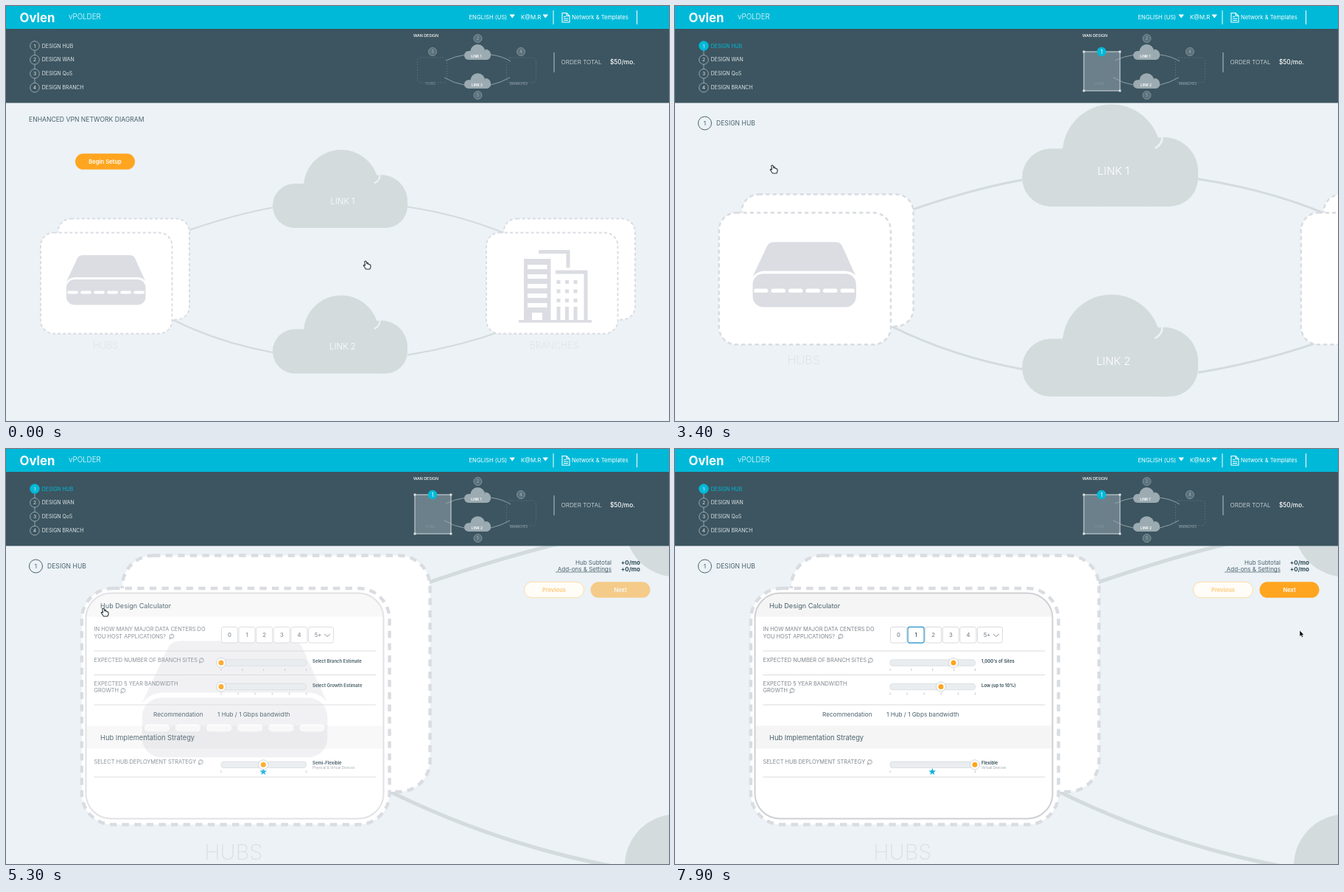
An HTML page that plays this animation: 900x563 px, repeating every 8 s.

```html
<!DOCTYPE html>
<html lang="en">
<head>
<meta charset="utf-8">
<title>Network setup</title>
<style>
html, body { margin: 0; width: 100%; height: 100%; overflow: hidden; background: #ecf2f6; }
svg { display: block; width: 900px; height: 563px; font-family: Inter, "Liberation Sans", sans-serif; }
.mid { text-anchor: middle; }
.end { text-anchor: end; }
</style>
</head>
<body>
<svg id="stage" viewBox="0 0 900 563"></svg>
<script>
const LOOP = 8000, STEP = 100;
const CYAN = '#00b9d8', DARK = '#3c5560', PALE = '#ecf2f6', CLOUD = '#d3dbdd',
      ICON = '#dcdde3', ORANGE = '#ffa51f', INK = '#4a626d', GREY = '#7f868d';

// --- Markup helpers ---
const attrs = o => Object.entries(o).map(([k, v]) => ` ${k}="${v}"`).join('');
const rect = (x, y, width, height, fill, more = {}) =>
  `<rect${attrs({ x, y, width, height, fill, ...more })}/>`;
const circle = (cx, cy, r, fill, more = {}) => `<circle${attrs({ cx, cy, r, fill, ...more })}/>`;
const line = (d, stroke, width = 1, more = {}) =>
  `<path${attrs({ d, fill: 'none', stroke, 'stroke-width': width, ...more })}/>`;
const shape = (d, fill, more = {}) => `<path${attrs({ d, fill, ...more })}/>`;
const text = (x, y, s, size, fill, more = {}) =>
  `<text${attrs({ x, y, 'font-size': size, fill, ...more })}>${s.replace(/&/g, '&amp;')}</text>`;
const group = (id, body, more = {}) => `<g${attrs({ id, ...more })}>${body}</g>`;
const MID = { class: 'mid' }, END = { class: 'end' };
const bold = (w = 600) => ({ 'font-weight': w });

// --- Diagram ---
function cloud(y, fill, gap) {
  return `<g transform="translate(0 ${y})">` +
    rect(362, 241, 183, 60, fill, { rx: 30 }) + circle(455, 246, 51, fill) +
    circle(509, 265, 36, fill) + rect(404, 240, 100, 50, fill) +
    line('M507.5 228Q508.5 236 500 240.5', gap, 2) + '</g>';
}

function cards(x) {
  const card = (x, y) => rect(x, y, 178.5, 137, '#fff',
    { rx: 18, stroke: '#d9dce1', 'stroke-width': 1.9, 'stroke-dasharray': '4 3.1' });
  return card(x + 23.5, 288.5) + card(x, 307.5);
}

function router() {
  let s = shape('M82 374L97 342Q99 338 105 338H168Q173 338 175 342L189 373Q185 368 178 368H94Q87 368 82 374Z', ICON) +
    rect(82, 371, 107.5, 34.5, ICON, { rx: 11 });
  for (let i = 0; i < 6; i++) s += rect(83.2 + 18 * i, 386.5, 14.8, 4, '#fff', { rx: 2 });
  return s;
}

function buildings() {
  let s = line('M723 333.5H763V355M746 361H787V427', ICON, 5) +
    rect(703, 343, 36.5, 85, ICON) + rect(696, 426, 99, 3.5, ICON);
  for (let i = 0; i < 5; i++) s += rect(708, 351 + 13 * i, 26.5, 6, '#fff');
  s += rect(714, 416, 14, 10, '#fff');
  for (const x of [747.5, 759, 770.5]) {
    for (const y of [372, 384.5, 397]) s += rect(x, y, 5, 5, ICON);
    s += rect(x, 408, 5, 19, ICON);
  }
  return s;
}

const LINKS = 'M226 312Q303 284 362 273.5M545 272.5Q615 283 676 308M226 425.5Q290 457 362 470M545 473.5Q615 462 676 440';

function diagram() {
  const thin = { class: 'mid', 'font-weight': 200 }, light = { class: 'mid', 'font-weight': 300 };
  return line(LINKS, CLOUD, 2.2) + cloud(0, CLOUD, PALE) + cloud(197.5, CLOUD, PALE) +
    text(457, 268.5, 'LINK 1', 11.4, '#fff', light) + text(457, 465.5, 'LINK 2', 11.4, '#fff', light) +
    cards(47) + cards(652) + router() + buildings() +
    text(135, 465, 'HUBS', 12.4, '#d9dfe3', thin) + text(744, 465, 'BRANCHES', 12.4, '#d9dfe3', thin);
}

// --- Header ---
function miniMap() {
  const dim = '#8295a0', fog = '#9cabb2';
  const badge = (x, y, n) => circle(x, y, 5.5, '#5b717b', { stroke: '#8c9da5', 'stroke-width': .8 }) +
    text(x, y + 2, n, 5.5, '#a9b7bd', MID);
  const site = x => rect(x, 70, 40, 34, 'none',
    { rx: 5, stroke: '#6d828c', 'stroke-width': .8, 'stroke-dasharray': '1.2 2.4' });
  return text(553, 42, 'WAN DESIGN', 5.3, '#fff', bold(500)) +
    group('pick', rect(555, 62, 49, 53, '#6b808a', { stroke: '#b9c4c9', 'stroke-width': 1.3 }) +
      [[555, 62], [604, 62], [555, 115], [604, 115]].map(([x, y]) => rect(x - 1.4, y - 1.4, 2.8, 2.8, '#e4e9eb')).join('')) +
    line('M597 74Q610 68 622 66.5M658 66Q674 68 685 75M595 97Q608 105 622 107M658 107Q672 104 684 97', '#a7b4ba', .8) +
    `<g transform="translate(550.7 13.6) scale(.197)">${cloud(0, fog, DARK)}${cloud(199, fog, DARK)}</g>` +
    text(638.5, 70, 'LINK 1', 4.8, '#fff', { class: 'mid', ...bold() }) +
    text(639.5, 109, 'LINK 2', 4.8, '#fff', { class: 'mid', ...bold() }) +
    site(558.5) + site(679.5) +
    text(576.5, 107, 'HUBS', 4.7, dim, MID) + text(696, 107, 'BRANCHES', 4.4, '#a0aeb5', MID) +
    badge(579, 62, '3') + badge(640.5, 44, '2') + badge(640.5, 121, '5') + badge(699, 62, '4') +
    group('pickDot', circle(579, 62, 6.2, CYAN) + text(579, 64.8, '1', 7.5, '#fff', MID));
}

function header() {
  let s = rect(0, 0, 900, 31, CYAN) + rect(0, 31, 900, 100.5, DARK) +
    text(18.5, 22, 'Ovlen', 16.8, '#fff', bold(700)) + text(85, 18, 'vPOLDER', 9.8, '#fff', bold(300)) +
    text(628.5, 18, 'ENGLISH (US)', 7.7, '#fff') + text(699, 18, 'K@M.R', 7.9, '#fff') +
    shape('M683.5 11.5h7.5l-3.75 5zM728.5 11.5h7.5l-3.75 5z', '#fff') +
    line('M743 6V25M856.5 6V25', '#fff') +
    line('M755 9.5h6l4 4v8.500h-10zM761 9.500v4h4M757 14.500h3M757 17h6M757 19.500h6', '#fff', 1.1) +
    text(768, 18, 'Network & Templates', 7.6, '#fff') +
    line('M744 63V90', '#b5c1c6') + text(753.500, 79, 'ORDER TOTAL', 8.2, '#e3e8eb', bold(300)) +
    text(820, 79, '$50/mo.', 8.3, '#fff', bold(500)) + line('M39 60.500V104', '#93a4ac');
  ['HUB', 'WAN', 'QoS', 'BRANCH'].forEach((name, i) => {
    const y = 54 + 18.9 * i;
    s += circle(39, y, 6.3, DARK, { id: 'dot' + i, stroke: '#a3b2b9', 'stroke-width': .9 }) +
      text(39, y + 2.5, String(i + 1), 6.800, '#dfe6e9', MID) +
      text(48.8, y + 2.5, 'DESIGN ' + name, 6.9, '#dde4e7', { id: 'step' + i });
  });
  return s + miniMap();
}

// --- Page text and buttons ---
function button(id, x, y, label, fill, ink, stroke = 'none') {
  return group(id, rect(x, y, 81, 21.5, fill, { rx: 10.75, stroke }) +
    text(x + 40.5, y + 13.200, label, 7.6, ink, { class: 'mid', ...bold(600) }));
}

function page() {
  return group('intro', text(31, 157, 'ENHANCED VPN NETWORK DIAGRAM', 8.6, INK) +
      button('begin', 94, 200.3, 'Begin Setup', ORANGE, '#fff')) +
    group('hubTitle', circle(40.5, 159, 9, 'none', { stroke: INK }) +
      text(40.5, 162, '1', 8.2, INK, MID) + text(56, 162, 'DESIGN HUB', 8.6, INK)) +
    group('totals', text(822, 157, 'Hub Subtotal', 8, INK, END) + text(822, 165.500, 'Add-ons & Settings', 8, INK, END) +
      line('M746 167H822', INK, .7) +
      text(861, 157, '+0/mo', 8, '#2f4a56', { ...END, ...bold(700) }) +
      text(861, 165.500, '+0/mo', 8, '#2f4a56', { ...END, ...bold(700) }) +
      button('prev', 703.5, 180.3, 'Previous', '#fffdf8', '#fdc877', '#fedca6') +
      button('next', 793.500, 180.3, 'Next', ORANGE, '#fff'));
}

// --- Calculator panel ---
const SLIDERS = [
  { y: 290, ticks: 5 },
  { y: 322.5, ticks: 6 },
  { y: 428.3, ticks: 3 }
];

function slider({ y, ticks }, i) {
  let s = rect(292, y - 4.200, 115.500, 8.4, '#e9edf0', { rx: 3.5, stroke: '#d6dbdf', 'stroke-width': .8 });
  for (let k = 0; k < ticks; k++) s += rect(291.500 + 115.500 * k / (ticks - 1), y + 8, 1, 3, '#c3c8cc');
  if (i === 2) {
    let d = '';
    for (let k = 0; k < 10; k++) {
      const a = Math.PI * k / 5, r = k % 2 ? 2.1 : 5;
      d += `${k ? 'L' : 'M'}${349.3 + r * Math.sin(a)} ${438 - r * Math.cos(a)}`;
    }
    s += shape(d + 'Z', '#12b2dc');
  }
  return s + group('knob' + i, circle(0, y, 6.5, '#fff', { stroke: '#cbcdd0', 'stroke-width': .9 }) +
      circle(0, y, 3.5, ORANGE)) +
    text(416, y + .3 - (i === 2 ? .2 : 0), '', 6, '#2f4a56', { id: 'value' + i, ...bold(600) });
}

function help(x, y) {
  return circle(x, y, 2.9, 'none', { stroke: '#969da3', 'stroke-width': .9 }) +
    line(`M${x - 2.5} ${y + 1}l-.8 2.700l2.500-.8`, '#969da3', .8) + text(x, y + 1.600, '?', 4.2, GREY, MID);
}

function panel() {
  const label = (y, s) => text(119.5, y, s, 7.4, GREY);
  let form = text(128, 216, 'Hub Design Calculator', 9.1, INK) +
    label(247, 'IN HOW MANY MAJOR DATA CENTERS DO') + label(256.5, 'YOU HOST APPLICATIONS?') +
    label(289, 'EXPECTED NUMBER OF BRANCH SITES') + label(320.500, 'EXPECTED 5 YEAR BANDWIDTH') + label(330, 'GROWTH') +
    text(200, 363.3, 'Recommendation', 8.2, INK) + text(287, 363.3, '1 Hub / 1 Gbps bandwidth', 8.2, INK) +
    text(128, 395, 'Hub Implementation Strategy', 9.3, INK) + label(427, 'SELECT HUB DEPLOYMENT STRATEGY') +
    help(225, 254) + help(265.500, 286.500) + help(159, 327.500) + help(264.500, 424.500) +
    line('M119.500 274H502M119.500 306.500H502M119.500 347H502M119.500 445H502', '#d9dadd');
  ['0', '1', '2', '3', '4', '5+'].forEach((n, i) => {
    const x = 292.500 + 23.6 * i;
    form += rect(x, 241.5, i === 5 ? 34 : 22, 21.5, '#fff', { id: 'box' + i, rx: 2.5, stroke: '#d9dbde' }) +
      text(x + (i === 5 ? 13 : 11), 255, n, 7.5, '#8b9198', { class: 'mid', id: 'num' + i, ...bold(600) });
  });
  form += line('M432 251l4 3.500l4-3.500', '#8b9198') + SLIDERS.map(slider).join('') +
    text(416, 433.5, '', 4.7, '#9ba1a7', { id: 'note' });
  return group('sheet',
    rect(108.5, 195.5, 404, 306, '#fff', { rx: 34 }) +
    '<clipPath id="round"><rect x="109" y="195" width="403" height="306" rx="34"/></clipPath>' +
    `<g clip-path="url(#round)">${rect(109, 195, 403, 32.5, '#f5f5f5')}${rect(109, 375.5, 403, 31, '#f5f5f5')}</g>` +
    rect(108.5, 195.500, 404, 306, 'none', { rx: 34, stroke: '#cfd0d4', 'stroke-width': 2 })) +
    group('form', form);
}

// --- Cursor ---
const HAND = 'M-1.200.800Q0-.800 1.200.800L1.900 4Q3-.1 3.800 4.400Q5 3.600 5.500 5Q7 4.500 7 6.300V8.600L5.800 11H.600L-2.700 6.300Q-2.600 4.600-.4 6Z';
const ARROW = 'M0 0V8.400L1.900 6.700L3.200 9.600L4.700 9L3.400 6.200H5.800Z';

function cursor() {
  const edge = { 'stroke-linejoin': 'round' };
  return circle(132, 216, 19.3, 'none', { id: 'ring', stroke: '#1b1b1b', 'stroke-width': 1.4 }) +
    group('hand', shape(HAND, '#fff', { stroke: '#24343c', 'stroke-width': 1.1, ...edge })) +
    group('arrow', shape(ARROW, '#000', { stroke: '#fff', 'stroke-width': .6, ...edge }));
}

const stage = document.getElementById('stage');
stage.innerHTML = group('world', diagram()) + page() + panel() + header() + cursor();
const el = {};
stage.querySelectorAll('[id]').forEach(n => el[n.id] = n);

// --- Motion tables: [time, value...] ---
const ZOOM = [[2500, 1], [2700, 1.008], [2900, 1.04], [3100, 1.11], [3400, 1.306], [3600, 1.43],
  [3800, 1.82], [4100, 2.26], [4300, 2.325], [4500, 2.34]];
const POINTER = [[400, 488, 346], [1800, 132, 216], [5350, 132, 216], [5600, 327, 252], [5750, 327, 252],
  [5900, 292, 290], [6150, 378, 290], [6300, 292, 322], [6500, 361, 322], [6700, 349, 428],
  [6900, 407, 428], [7100, 425, 436], [7300, 425, 436], [7800, 848, 246]];
const KNOBS = [[[5900, 292], [6150, 378]], [[6300, 292], [6500, 361]], [[6700, 349.3], [6900, 407]]];
const RING = [[2000, 13], [2100, 19.3], [2200, 23]];
const smooth = u => u * u * (3 - 2 * u);

function at(keys, t, ease = u => u) {
  let i = keys.findIndex(k => k[0] > t);
  if (i < 0) return keys[keys.length - 1].slice(1);
  if (!i) return keys[0].slice(1);
  const a = keys[i - 1], b = keys[i], u = ease((t - a[0]) / (b[0] - a[0]));
  return a.slice(1).map((v, k) => v + (b[k + 1] - v) * u);
}

const set = (id, o) => { for (const k in o) el[id].setAttribute(k, o[k]); };
const show = (id, on) => set(id, { opacity: +on });
const say = (id, s) => { if (el[id].textContent !== s) el[id].textContent = s; };

function draw(t) {
  const [s] = at(ZOOM, t);
  set('world', { transform: `translate(${-5.3 * (s - 1)} ${-396 * (s - 1)}) scale(${s})` });

  const started = t >= 2400;
  show('intro', !started);
  ['hubTitle', 'pick', 'pickDot'].forEach(id => show(id, started));
  set('dot0', { fill: started ? CYAN : DARK, stroke: started ? CYAN : '#a3b2b9' });
  set('step0', { fill: started ? CYAN : '#dde4e7' });

  show('sheet', at([[4900, 0], [5300, .6], [5600, 1]], t)[0]);
  show('form', at([[4800, 0], [5300, .9], [5500, 1]], t)[0]);
  show('totals', at([[4700, 0], [5200, 1]], t)[0]);
  show('next', t >= 6900 ? 1 : .5);

  const chosen = t >= 5700;
  set('box1', { stroke: chosen ? '#3f9fcf' : '#d9dbde', 'stroke-width': chosen ? 1.3 : 1 });
  set('num1', { fill: chosen ? INK : '#8b9198' });
  KNOBS.forEach((keys, i) => set('knob' + i, { transform: `translate(${at(keys, t, smooth)[0]} 0)` }));
  say('value0', t >= 6100 ? "1,000's of Sites" : 'Select Branch Estimate');
  say('value1', t >= 6500 ? 'Low (up to 10%)' : 'Select Growth Estimate');
  say('value2', t >= 6900 ? 'Flexible' : 'Semi-Flexible');
  say('note', t >= 6900 ? 'Virtual Devices' : 'Physical & Virtual Devices');

  const [x, y] = at(POINTER, t, smooth);
  const move = { transform: `translate(${x} ${y})` };
  set('hand', move);
  set('arrow', move);
  show('hand', t < 7000);
  show('arrow', t >= 7000);
  show('ring', t >= 2000 && t < 2300);
  set('ring', { r: at(RING, t)[0] });
}

const begin = performance.now();
function tick() {
  const t = (performance.now() - begin) % LOOP;
  draw(Math.floor(t / STEP) * STEP);
  requestAnimationFrame(tick);
}
tick();
</script>
</body>
</html>
```
